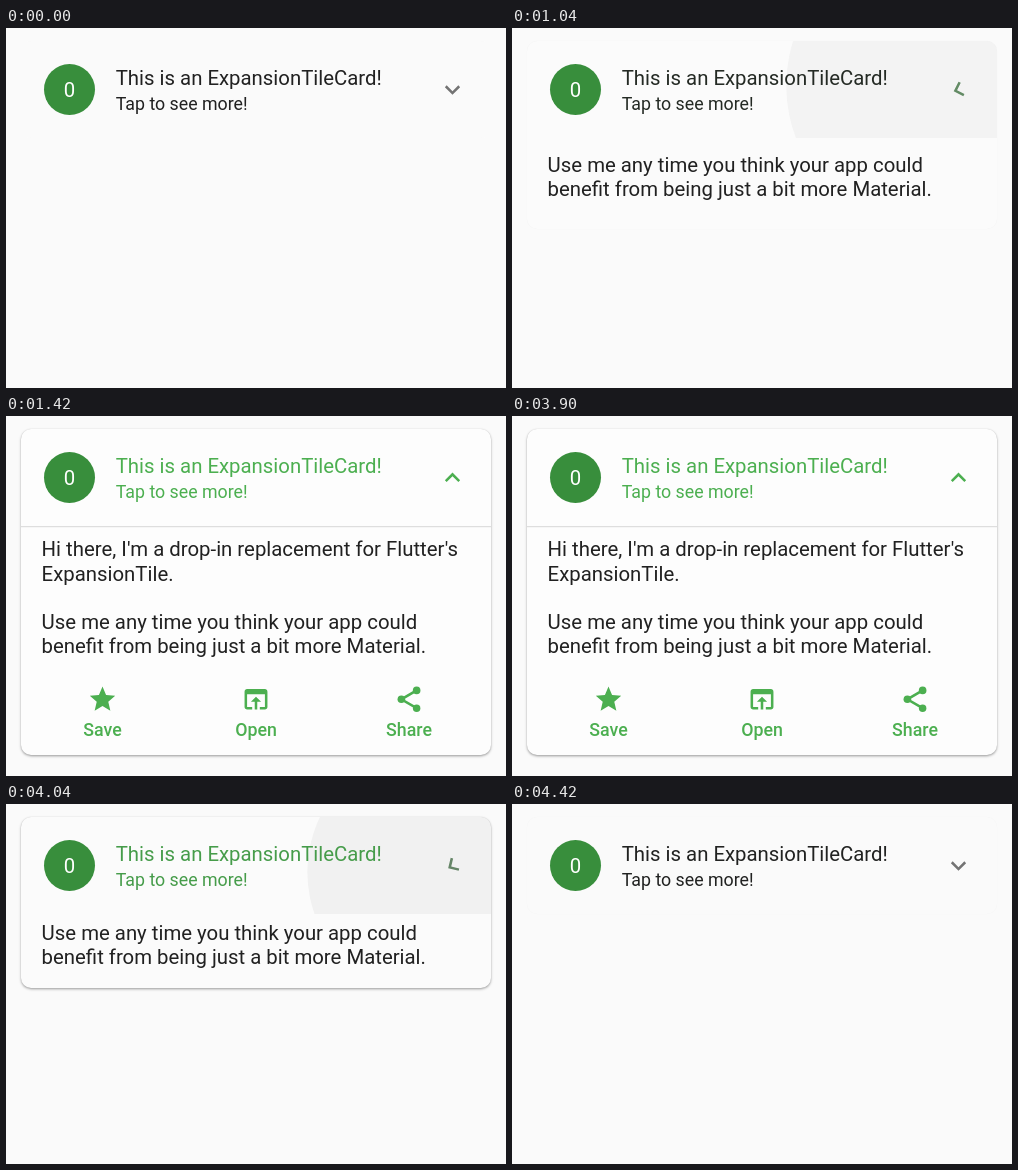
These frames come from a looping animation (500x360 px, 4460 ms). An HTML page:

```html
<!DOCTYPE html>
<html lang="en">
<head>
<meta charset="utf-8">
<title>Expansion tile card</title>
<style>
  html, body { margin: 0; width: 100%; height: 100%; overflow: hidden; background: #fafafa; }
  #card { position: absolute; left: 15px; top: 13px; width: 470px; border-radius: 10px; overflow: hidden; }
  svg { display: block; }
  text { font: 20.36px Roboto, sans-serif; white-space: pre; }
  .small { font-size: 17.8px; }
  .mid { text-anchor: middle; }
  #body { fill: #212121; }
  #body .action { fill: #4caf50; }
  .action text { font-size: 17.8px; font-weight: 500; text-anchor: middle; }
</style>
</head>
<body>
<div id="card">
  <svg id="head" width="470" height="97" viewBox="15 13 470 97">
    <circle id="ripple" fill="#c8c8c8"/>
    <circle cx="63.5" cy="61.5" r="25.5" fill="#388e3c"/>
    <text class="mid" x="63.5" y="68.8" fill="#fff">0</text>
    <g id="titles">
      <text x="109.7" y="56.7">This is an ExpansionTileCard!</text>
      <text class="small" x="109.7" y="82.2">Tap to see more!</text>
    </g>
    <path id="arrow" d="M16.59 8.59L12 13.17 7.41 8.59 6 10l6 6 6-6z"/>
  </svg>
  <svg id="body" width="470">
    <path d="M15 110h470v1.2H15z" fill="#000" fill-opacity=".12"/>
    <text x="35.6" y="140.4">Hi there, I'm a drop-in replacement for Flutter's</text>
    <text x="35.6" y="164.6">ExpansionTile.</text>
    <text x="35.6" y="213.1">Use me any time you think your app could</text>
    <text x="35.6" y="237.3">benefit from being just a bit more Material.</text>
    <g class="action" transform="translate(96.5 283.3)">
      <path transform="scale(1.272) translate(-12 -12)" d="M12 17.27L18.18 21l-1.64-7.03L22 9.24l-7.19-.61L12 2 9.19 8.63 2 9.24l5.46 4.73L5.82 21z"/>
      <text y="36.9">Save</text>
    </g>
    <g class="action" transform="translate(250 283.3)">
      <path transform="scale(1.272) translate(-12 -12)" d="M19 4H5c-1.11 0-2 .9-2 2v12c0 1.1.89 2 2 2h4v-2H5V8h14v10h-4v2h4c1.1 0 2-.9 2-2V6c0-1.1-.89-2-2-2zm-7 6l-4 4h3v6h2v-6h3l-4-4z"/>
      <text y="36.9">Open</text>
    </g>
    <g class="action" transform="translate(403 283.3)">
      <g transform="scale(1.272) translate(-12 -12)">
        <path d="M18 5L6 12l12 7" fill="none" stroke="#4caf50" stroke-width="2"/>
        <circle cx="18" cy="5" r="3"/><circle cx="6" cy="12" r="3"/><circle cx="18" cy="19" r="2.92"/>
      </g>
      <text y="36.9">Share</text>
    </g>
  </svg>
</div>
<script>
const LOOP = 4460, STEP = 20, SPAN = 12.2, LAST = 13;   // SPAN: steps per transition
const HEAD = 97, BODY = 229;
const $ = id => document.getElementById(id);
const clamp = x => Math.min(1, Math.max(0, x));
const mix = (a, b, p) => `rgb(${a.map((v, i) => Math.round(v + (b[i] - v) * p))})`;

function bezier(x1, y1, x2, y2) {
  const at = (a, b, s) => 3 * (1 - s) * (1 - s) * s * a + 3 * (1 - s) * s * s * b + s * s * s;
  return x => {
    if (x <= 0 || x >= 1) return clamp(x);
    let lo = 0, hi = 1;
    for (let i = 0; i < 24; i++) {
      const s = (lo + hi) / 2;
      if (at(x1, x2, s) < x) lo = s; else hi = s;
    }
    return at(y1, y2, lo);
  };
}
const easeIn = bezier(.42, 0, 1, 1);
const easeOut = bezier(0, 0, .58, 1);
const fastOutSlowIn = bezier(.4, 0, .2, 1);
const linear = x => x;

// A follower that restarts its own transition each time its goal moves.
function follow(n, goal, curve) {
  let v = goal(0);
  for (let k = 1; k <= Math.min(n, LAST); k++) v += (goal(k - 1) - v) * curve(1 / SPAN);
  if (n > LAST) v += (goal(LAST) - v) * curve(clamp((n - LAST) / SPAN));
  return v;
}

function draw(ms) {
  const t = Math.floor(ms / STEP) * STEP;
  const opening = t < 3900;
  const n = !opening ? Math.max(0, (t - 3920) / STEP)
    : t < 920 ? 0 : Math.max(2, (t - 900) / STEP);
  const progress = k => opening ? clamp(k / SPAN) : 1 - clamp(k / SPAN);

  const p = easeIn(progress(n));
  const tint = follow(n, k => easeIn(progress(k)), linear);
  const lift = follow(n, k => easeOut(progress(k)), fastOutSlowIn);

  const h = BODY * p;
  const card = $('card').style;
  card.height = HEAD + h + 'px';
  card.background = mix([250, 250, 250], [253, 253, 253], p);
  card.boxShadow = lift > 0
    ? `0 0 1px rgba(0,0,0,${.04 + .1 * lift}), 0 ${1.3 * lift}px ${2.5 * lift}px rgba(0,0,0,${.34 * lift})`
    : 'none';

  $('body').style.display = h > 0 ? 'block' : 'none';
  if (h > 0) {
    $('body').setAttribute('height', h);
    $('body').setAttribute('viewBox', `15 ${110 + (BODY - h) / 2} 470 ${h}`);
  }

  $('titles').setAttribute('fill', mix([33, 33, 33], [76, 175, 80], tint));
  $('arrow').setAttribute('fill', mix([115, 115, 115], [76, 175, 80], p));
  $('arrow').setAttribute('transform',
    `translate(446.5 61.7) rotate(${180 * p}) scale(1.272) translate(-12 -12)`);

  const ripple = $('ripple');
  ripple.setAttribute('cx', opening ? 422 : 428);
  ripple.setAttribute('cy', opening ? 57.5 : 68);
  ripple.setAttribute('r', 21.1 * n);
  ripple.setAttribute('fill-opacity', .4 * clamp(1 - n / SPAN));
}

const start = performance.now();
function tick() {
  draw((performance.now() - start) % LOOP);
  requestAnimationFrame(tick);
}
tick();
</script>
</body>
</html>
```
